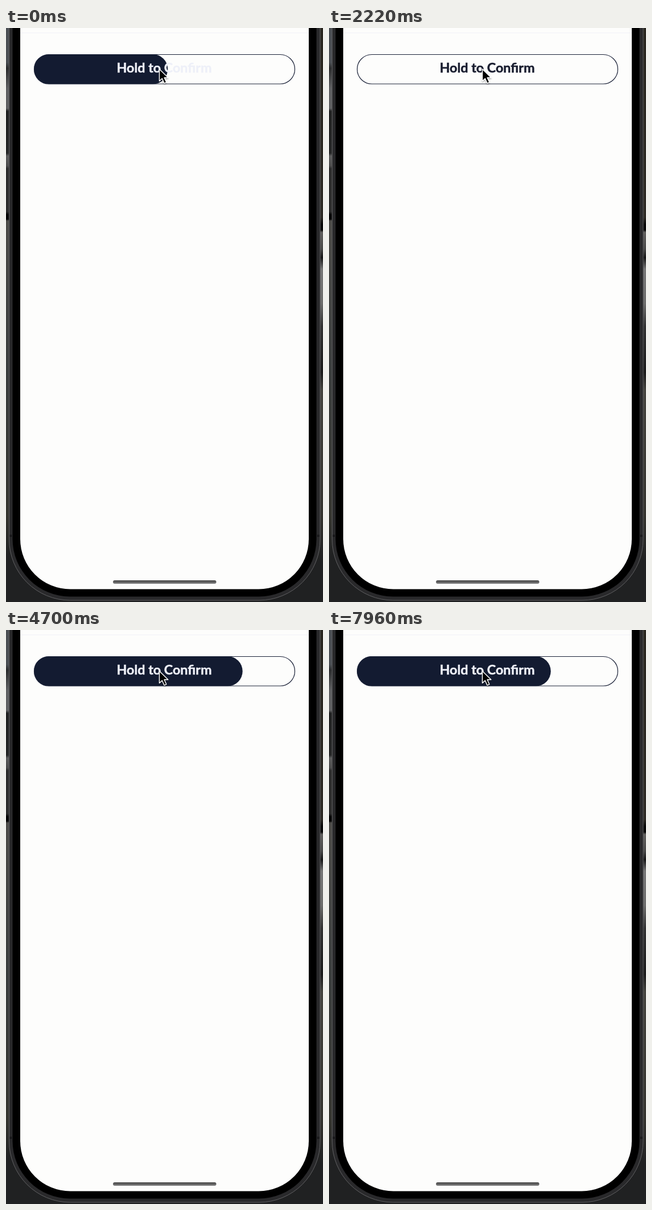
These frames come from a looping animation (557x1006 px, 8 s). An HTML page:

```html
<!DOCTYPE html>
<html lang="en">
<head>
<meta charset="utf-8">
<title>Hold to Confirm</title>
<style>
  html, body { margin: 0; width: 100%; height: 100%; overflow: hidden; background: #222; }
  svg { display: block; width: 100%; height: 100%; }

  .label {
    font: 700 23.3px Lato, "Open Sans", sans-serif;
    text-anchor: middle;
    fill: currentColor;
    stroke: currentColor;
    stroke-width: .5px;
    animation: label 8s linear infinite;
  }
  .fill { fill: #131b31; animation: hold 8s linear infinite; }

  /* Fills while held and drains at the same pace when let go. */
  @keyframes hold {
    0% { width: 235px; }
    4.39% { width: 346px; }
    18.1%, 44.2% { width: 0; }
    58.75% { width: 367px; }
    69.375% { width: 99px; }
    75.73% { width: 259px; }
    86% { width: 0; }
    100% { width: 353px; }
  }

  /* Light while held, dark when let go. */
  @keyframes label {
    0%, 4.39% { color: #eef0f8; }
    6.25%, 44.2% { color: #1a1e30; }
    46.1%, 58.75% { color: #eef0f8; }
    60.6%, 69.375% { color: #1a1e30; }
    71.25%, 75.73% { color: #eef0f8; }
    77.6%, 86% { color: #1a1e30; }
    87.9%, 100% { color: #eef0f8; }
  }
</style>
</head>
<body>
<svg viewBox="0 0 557 1006" preserveAspectRatio="none">
  <defs>
    <linearGradient id="left" x2="0" y2="1">
      <stop offset="0" stop-color="#4b4f54"/>
      <stop offset=".06" stop-color="#4b4f54"/>
      <stop offset=".07" stop-color="#2c2d2e"/>
      <stop offset=".105" stop-color="#5f6062"/>
      <stop offset=".14" stop-color="#5f6062"/>
      <stop offset=".145" stop-color="#202121"/>
      <stop offset=".218" stop-color="#252626"/>
      <stop offset=".223" stop-color="#5c5c5c"/>
      <stop offset=".24" stop-color="#4c4c4c"/>
      <stop offset=".245" stop-color="#2c2c2c"/>
      <stop offset=".32" stop-color="#2c2c2c"/>
      <stop offset=".325" stop-color="#050505"/>
      <stop offset=".333" stop-color="#050505"/>
      <stop offset=".336" stop-color="#4c4b48"/>
      <stop offset=".6" stop-color="#3a3d3d"/>
      <stop offset=".85" stop-color="#35352f"/>
      <stop offset=".92" stop-color="#202122"/>
      <stop offset="1" stop-color="#202122"/>
    </linearGradient>
    <linearGradient id="right" x2="0" y2="1">
      <stop offset="0" stop-color="#29261f"/>
      <stop offset=".33" stop-color="#2e2b25"/>
      <stop offset=".342" stop-color="#080808"/>
      <stop offset=".352" stop-color="#080808"/>
      <stop offset=".356" stop-color="#62615f"/>
      <stop offset=".385" stop-color="#4a4a49"/>
      <stop offset=".4" stop-color="#161616"/>
      <stop offset=".42" stop-color="#777"/>
      <stop offset=".48" stop-color="#6d6d6c"/>
      <stop offset=".52" stop-color="#333"/>
      <stop offset=".6" stop-color="#1b1b1b"/>
      <stop offset=".63" stop-color="#45443f"/>
      <stop offset=".85" stop-color="#35342f"/>
      <stop offset=".93" stop-color="#202122"/>
      <stop offset="1" stop-color="#202122"/>
    </linearGradient>
    <linearGradient id="bar" x2="0" y2="1">
      <stop offset="0" stop-color="#444"/>
      <stop offset="1" stop-color="#808080"/>
    </linearGradient>
    <clipPath id="pill"><rect x="49" y="46" width="459" height="52.5" rx="26.25"/></clipPath>
    <filter id="shadow" x="-50%" y="-50%" width="200%" height="200%">
      <feDropShadow dx="0" dy="1.5" stdDeviation="1.3" flood-opacity=".4"/>
    </filter>
  </defs>

  <rect width="279" height="1006" fill="url(#left)"/>
  <rect x="278" width="279" height="1006" fill="url(#right)"/>

  <!-- phone -->
  <rect x="5.5" y="-300" width="546.5" height="1303" rx="107" fill="#29292b" stroke="#606062"/>
  <rect x="11.5" y="-300" width="534" height="1296.5" rx="101"/>
  <path d="M6 890h6M545 890h6" stroke="#1b1b1d" stroke-width="4"/>
  <rect x="25" y="-300" width="507" height="1283.5" rx="88" fill="#fdfdfc"/>
  <path d="M25 8.5h507" stroke="#f1f2f8"/>
  <rect x="188" y="968" width="181.5" height="6" rx="3" fill="url(#bar)"/>

  <!-- button -->
  <g clip-path="url(#pill)"><rect class="fill" x="49" y="46" height="52.5" rx="26.25"/></g>
  <rect x="49.5" y="46.5" width="458" height="51.5" rx="25.75" fill="none" stroke="#1b2238" stroke-width="1.2"/>
  <text class="label" x="278" y="78">Hold to Confirm</text>

  <path d="M269.5 72v21l4.8-4.5 3.7 8.3 3.8-1.6-3.7-8.2h6.7z"
        stroke="#fff" stroke-width="1.4" stroke-linejoin="round" filter="url(#shadow)"/>
</svg>
</body>
</html>
```
